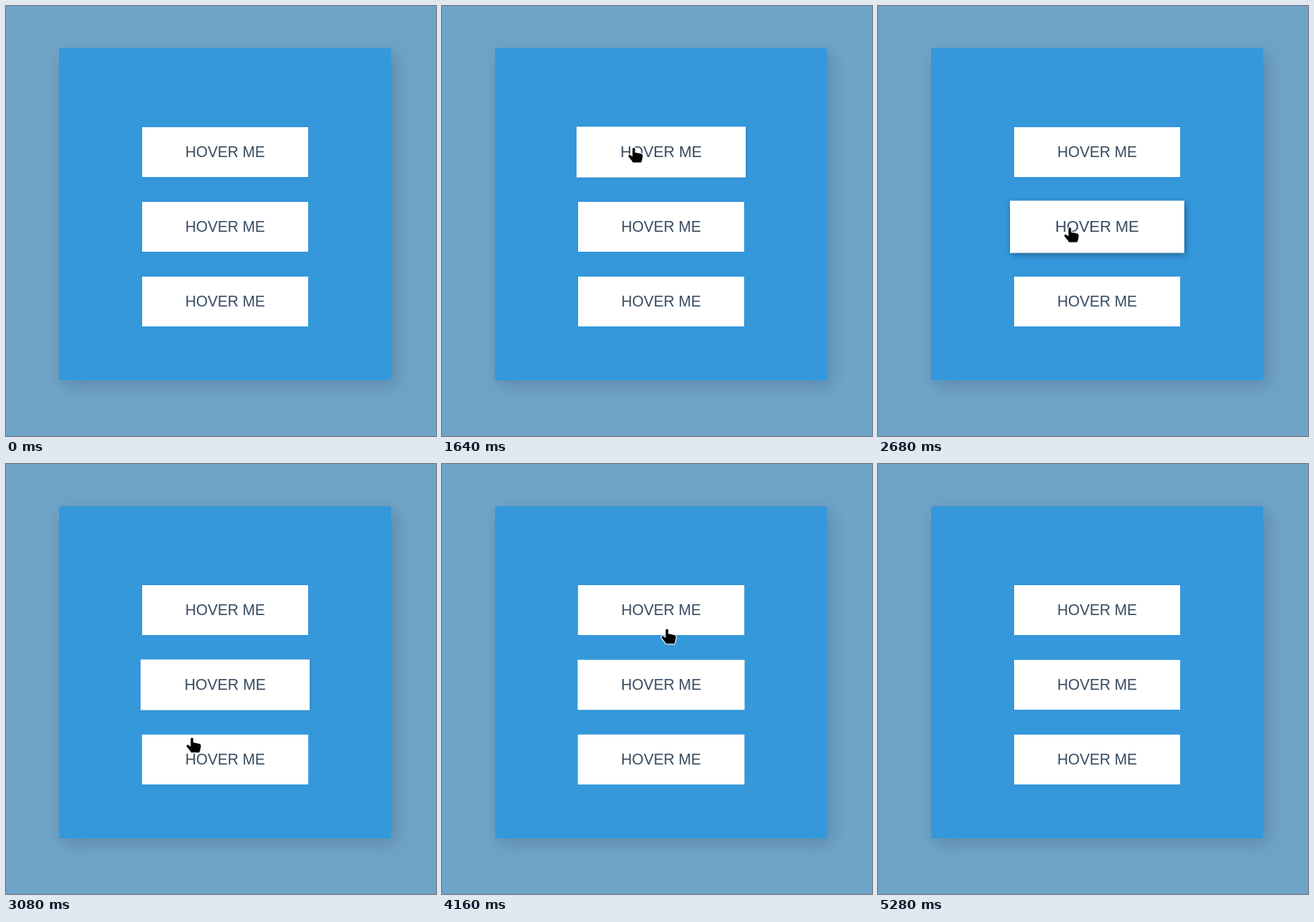
Animation, 518 px wide and 518 px high, one loop 5960 ms. Source, as an HTML page:

```html
<!DOCTYPE html>
<html lang="en">
<head>
<meta charset="utf-8">
<title>Hover buttons</title>
<style>
  html, body { margin: 0; height: 100%; overflow: hidden; background: #6fa3c8; }
  .panel {
    position: absolute; left: 64px; top: 51px; width: 400px; height: 400px;
    background: #3498db; box-shadow: 5px 6px 18px rgba(0, 0, 0, .16);
  }
  .button {
    position: absolute; left: 100px; width: 200px; height: 60px;
    background: #fff; color: #34495e; text-align: center;
    font: 18px/60px "Liberation Sans", Arial, sans-serif;
  }
  svg { position: absolute; left: 0; top: 0; width: 100%; height: 100%; }
  path { stroke: #fff; stroke-width: 2; stroke-linejoin: round; paint-order: stroke; }
</style>
</head>
<body>
<div class="panel"></div>
<svg><path id="cursor"/></svg>
<script>
const LOOP = 5960, STEP = 40, FADE = 300;
const LEFT = 164, TOP = 146, WIDTH = 200, HEIGHT = 60, PITCH = 90;
const ARROW = 'M1 1V15.5L4.3 12.5L6.6 17.6L8.8 16.6L6.6 11.7H11Z';
const HAND = 'M-1.5 .7Q0 -1.1 1.5 .7V5.5L9 7.1Q11 7.7 10.8 10L10 14.5L9 17.5H-1L-2.6 14.9L-6.6 10.1Q-6.6 7.9 -4.4 8.5L-1.5 10.5Z';

// The pointer glides from stop to stop
const outside = { x: 118, y: -16 };
const moves = [
  { start: 1120, end: 1760, x: 242, y: 190 },
  { start: 2240, end: 2480, x: 231, y: 267 },
  { start: 2800, end: 3280, x: 220, y: 368 },
  { start: 3840, end: 4212, x: 274, y: 190 },
  { start: 4880, end: 5160, ...outside }
];

const clamp = v => Math.min(1, Math.max(0, v));
const smooth = u => u * u * (3 - 2 * u);

// CSS "ease": cubic-bezier(.25, .1, .25, 1)
function ease(v) {
  const x = clamp(v);
  if (x === 0 || x === 1) return x;
  const curve = (u, a, b) => 3 * u * (1 - u) ** 2 * a + 3 * u * u * (1 - u) * b + u ** 3;
  let low = 0, high = 1;
  for (let i = 0; i < 20; i++) {
    const mid = (low + high) / 2;
    if (curve(mid, .25, .25) < x) low = mid; else high = mid;
  }
  return curve(low, .1, 1);
}

function pointerAt(t) {
  let { x, y } = outside;
  for (const move of moves) {
    const k = smooth(clamp((t - move.start) / (move.end - move.start)));
    x += (move.x - x) * k;
    y += (move.y - y) * k;
  }
  return { x, y };
}

function buttonUnder({ x, y }) {
  const row = Math.floor((y - TOP) / PITCH);
  const inside = x >= LEFT && x < LEFT + WIDTH && y - TOP - row * PITCH < HEIGHT;
  return inside && row >= 0 && row < 3 ? row : -1;
}

const buttons = [0, 1, 2].map(row => {
  const element = document.createElement('div');
  element.className = 'button';
  element.textContent = 'HOVER ME';
  element.style.top = `${95 + row * PITCH}px`;
  document.querySelector('.panel').append(element);
  return { element, spans: [] };
});

// Follow the pointer once to learn when it enters and leaves each button
for (let t = 0, last = -1; t < LOOP; t += 2) {
  const row = buttonUnder(pointerAt(t));
  if (row !== last) {
    if (last >= 0) buttons[last].spans.at(-1).leave = t;
    if (row >= 0) buttons[row].spans.push({ enter: t });
    last = row;
  }
}

// A fade broken off early also runs back in less time
function hoverAmount(t, { enter, leave }) {
  const rise = ease((Math.min(t, leave) - enter) / FADE);
  return t > leave ? rise * (1 - ease((t - leave) / (FADE * rise))) : rise;
}

const cursor = document.getElementById('cursor');

function draw(t) {
  for (const { element, spans } of buttons) {
    const p = Math.max(...spans.map(span => hoverAmount(t, span)));
    element.style.transform = p ? `scale(${1 + .05 * p})` : 'none';
    element.style.boxShadow = p ? `${2 * p}px ${2 * p}px ${7 * p}px rgba(0, 0, 0, ${.42 * p})` : 'none';
  }
  const point = pointerAt(t);
  cursor.style.display = t > moves[0].start && t < moves.at(-1).end ? '' : 'none';
  cursor.setAttribute('d', buttonUnder(point) >= 0 ? HAND : ARROW);
  cursor.setAttribute('transform', `translate(${Math.round(point.x)} ${Math.round(point.y)})`);
}

const start = performance.now();
function tick() {
  const t = (performance.now() - start) % LOOP;
  draw(Math.floor(t / STEP) * STEP);
  requestAnimationFrame(tick);
}
tick();
</script>
</body>
</html>
```
